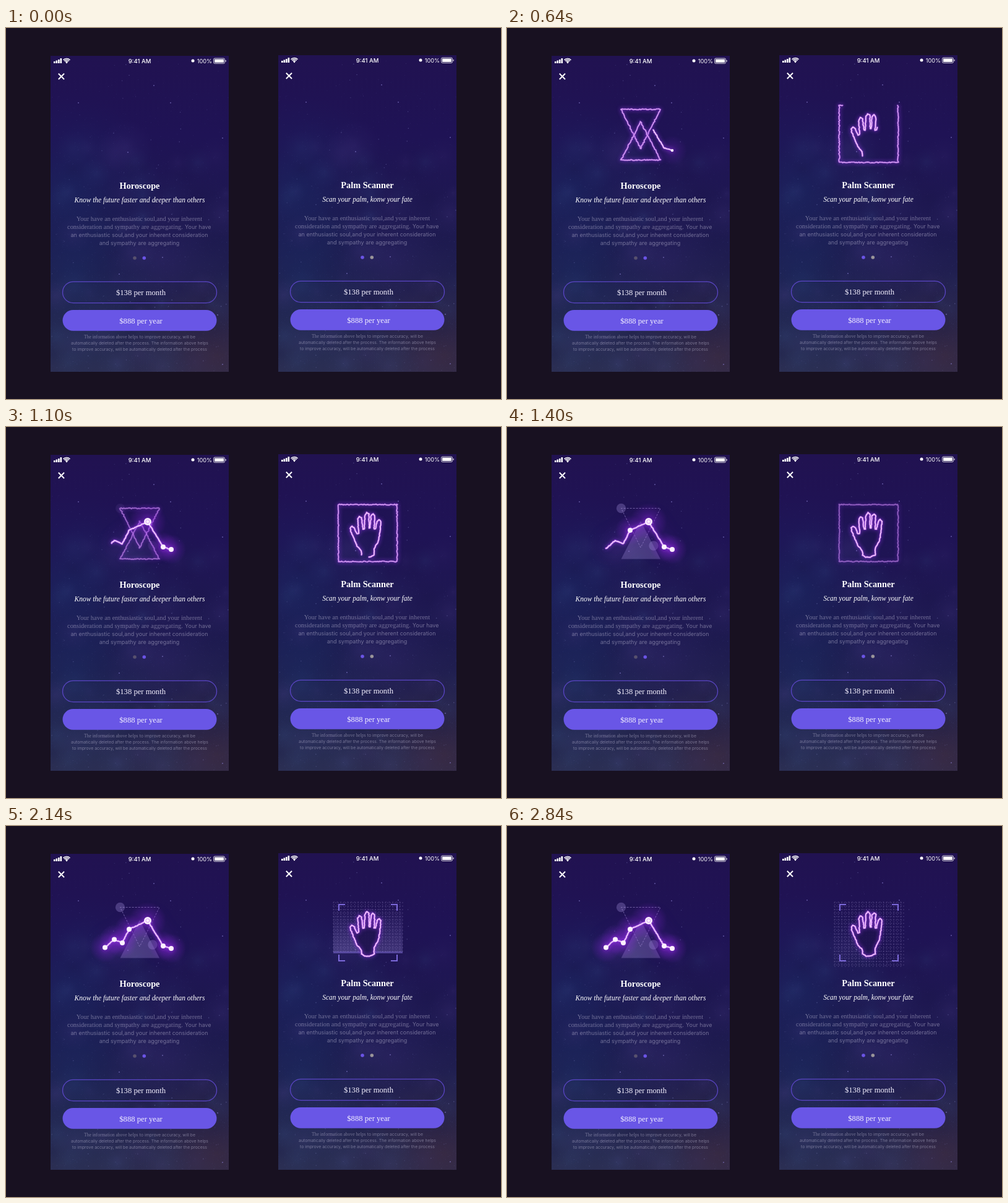
Animation of 800 by 600 pixels, one loop 2.88 s. Source, as an HTML page with a canvas:

```html
<!DOCTYPE html>
<html lang="en">
<head>
<meta charset="utf-8">
<title>Horoscope and Palm Scanner</title>
<style>
html, body { margin: 0; width: 100%; height: 100%; overflow: hidden; background: #181121; }
canvas { display: block; }
</style>
</head>
<body>
<canvas id="stage" width="800" height="600"></canvas>
<script>
const LOOP = 2880, TAU = Math.PI * 2;
const SERIF = '"Liberation Serif", serif', SANS = 'Inter, sans-serif';
const stage = document.getElementById('stage').getContext('2d');
const backdrop = document.createElement('canvas');
backdrop.width = 800;
backdrop.height = 600;

const clamp = v => Math.max(0, Math.min(1, v));
const ramp = (t, a, b) => clamp((t - a) / (b - a));
const easeOut = (u, k) => 1 - (1 - u) ** k;
const easeSine = u => (1 - Math.cos(Math.PI * u)) / 2;

function random(seed) {
  return () => (seed = (seed * 16807) % 2147483647) / 2147483647;
}

function disc(c, x, y, r, fill) {
  c.fillStyle = fill;
  c.beginPath();
  c.arc(x, y, r, 0, TAU);
  c.fill();
}

function glow(c, x, y, r, rgb, alpha) {
  const g = c.createRadialGradient(x, y, 0, x, y, r);
  g.addColorStop(0, `rgba(${rgb},${alpha})`);
  g.addColorStop(0.45, `rgba(${rgb},${alpha * 0.4})`);
  g.addColorStop(1, `rgba(${rgb},0)`);
  c.fillStyle = g;
  c.fillRect(x - r, y - r, r * 2, r * 2);
}

function polyline(c, pts, closed) {
  c.beginPath();
  pts.forEach(([x, y]) => c.lineTo(x, y));
  if (closed) c.closePath();
}

// Static screens, drawn once; coordinates are those of the left phone.

function text(c, str, x, y, font, fill, align = 'center') {
  c.font = font;
  c.fillStyle = fill;
  c.textAlign = align;
  c.fillText(str, x, y);
}

function sky(c, height) {
  c.save();
  c.beginPath();
  c.rect(72, 45, 288, height);
  c.clip();
  const g = c.createLinearGradient(0, 45, 0, 556);
  g.addColorStop(0, '#211251');
  g.addColorStop(0.25, '#1f1355');
  g.addColorStop(0.6, '#1e1b50');
  g.addColorStop(0.85, '#24244d');
  g.addColorStop(1, '#2c2b4e');
  c.fillStyle = g;
  c.fillRect(72, 45, 288, 512);
  glow(c, 105, 260, 150, '22,52,108', 0.35);
  glow(c, 110, 400, 150, '22,50,108', 0.35);
  glow(c, 255, 375, 100, '58,44,122', 0.25);
  glow(c, 110, 530, 140, '38,58,100', 0.35);
  glow(c, 340, 530, 130, '68,42,58', 0.5);

  const rnd = random(4127);
  // Mottled clouds drifting down the left side and across the middle.
  for (let i = 0; i < 90; i++) {
    const x = 72 + rnd() * 288, y = 190 + rnd() * 360;
    const tone = ['60,90,150', '20,16,60', '90,70,150'][i % 3];
    glow(c, x, y, 12 + rnd() * 34, tone, 0.05 + rnd() * 0.1);
  }
  for (let i = 0; i < 2600; i++) {
    c.fillStyle = `rgba(140,150,215,${rnd() * 0.12})`;
    c.fillRect(72 + rnd() * 288, 45 + 511 * Math.sqrt(rnd()), 1, 1);
  }
  for (let i = 0; i < 130; i++)
    disc(c, 72 + rnd() * 288, 45 + rnd() * 511, 0.3 + rnd() * 0.6, `rgba(155,160,225,${0.1 + rnd() * 0.3})`);
  [[239, 93], [266, 121], [117, 121], [350, 178], [197, 201], [253, 371], [183, 398], [342, 464], [350, 544]]
    .forEach(([x, y]) => disc(c, x, y, 1.1, 'rgba(150,140,225,.5)'));
  c.restore();
}

function statusBar(c) {
  c.fillStyle = '#fff';
  [3, 4.5, 6, 8].forEach((h, i) => c.fillRect(77 + i * 3.5, 57 - h, 2.6, h));
  c.strokeStyle = '#fff';
  c.lineWidth = 1.5;
  [2.9, 5.3, 7.6].forEach(r => {
    c.beginPath();
    c.arc(98, 57, r, -Math.PI * 0.76, -Math.PI * 0.24);
    c.stroke();
  });
  disc(c, 98, 56, 1.2, '#fff');
  text(c, '9:41 AM', 216, 56.5, `500 9.5px ${SANS}`, '#fff');
  disc(c, 302, 53, 2.5, '#fff');
  text(c, '100%', 333, 56.5, `400 9.2px ${SANS}`, '#fff', 'right');
  c.lineWidth = 0.8;
  c.beginPath();
  c.roundRect(335.5, 49, 18, 8.5, 2);
  c.stroke();
  c.fillRect(337, 50.5, 15, 5.5);
  c.fillRect(354.6, 52, 1, 2.6);

  c.lineWidth = 2;
  c.beginPath();
  c.moveTo(84.8, 73.8); c.lineTo(94, 83);
  c.moveTo(94, 73.8); c.lineTo(84.8, 83);
  c.stroke();
}

function phone(c, dx, dy, height, title, tagline, dots) {
  c.save();
  c.translate(dx, dy);
  sky(c, height);
  statusBar(c);
  text(c, title, 216, 260, `bold 14.3px ${SERIF}`, '#fff');
  text(c, tagline, 216, 281.5, `italic 11.45px ${SERIF}`, '#fff');

  const body = 'rgba(205,200,225,.48)';
  const bodySerif = `10.45px ${SERIF}`, bodySans = `9px ${SANS}`;
  text(c, 'Your have an enthusiastic soul,and your inherent', 215.5, 312, bodySerif, body);
  text(c, 'consideration and sympathy are aggregating.', 99, 325, bodySerif, body, 'left');
  text(c, 'Your have', 331.5, 325, bodySans, body, 'right');
  text(c, 'an enthusiastic soul,and your inherent consideration', 215.5, 338, bodySans, body);
  text(c, 'and sympathy are aggregating', 215.5, 350.5, bodySans, body);

  dots.forEach((fill, i) => disc(c, 208 + i * 15.3, 372, 2.8, fill));

  c.strokeStyle = '#5a45c4';
  c.lineWidth = 1.3;
  c.beginPath();
  c.roundRect(91.5, 410.4, 249, 34.2, 17.1);
  c.stroke();
  c.fillStyle = '#6956e6';
  c.beginPath();
  c.roundRect(91.5, 456, 249, 33.8, 16.9);
  c.fill();
  text(c, '$138 per month', 218, 432, `12.65px ${SERIF}`, '#f4f1ff');
  text(c, '$888 per year', 218, 477.5, `12.65px ${SERIF}`, '#f4f1ff');

  const noteSans = `6.85px ${SANS}`;
  text(c, 'The information above helps', 126, 501.5, `7.6px ${SERIF}`, body, 'left');
  text(c, 'to improve accuracy, will be', 306, 501.5, noteSans, body, 'right');
  text(c, 'automatically deleted after the process. The information above helps', 216, 511.5, noteSans, body);
  text(c, 'to improve accuracy, will be automatically deleted after the process', 216, 521.5, noteSans, body);
  c.restore();
}

function drawBackdrop() {
  const c = backdrop.getContext('2d');
  c.fillStyle = '#181121';
  c.fillRect(0, 0, 800, 600);
  phone(c, 0, 0, 511, 'Horoscope', 'Know the future faster and deeper than others', ['#58516e', '#6b54e6']);
  phone(c, 368, -1, 512, 'Palm Scanner', 'Scan your palm, konw your fate', ['#6b54e6', '#9a9599']);
}

// Electric strokes: even samples along a path, shaken a little on every tick.

function sample(pts) {
  const out = [];
  for (let i = 1; i < pts.length; i++) {
    const [ax, ay] = pts[i - 1], [bx, by] = pts[i];
    const n = Math.max(1, Math.round(Math.hypot(bx - ax, by - ay) / 2));
    for (let j = 0; j < n; j++) out.push([ax + (bx - ax) * j / n, ay + (by - ay) * j / n]);
  }
  out.push(pts[pts.length - 1]);
  return out;
}

const topTriangle = [[216, 195], [184.5, 131.5], [248, 131.5], [216, 195]];
const lowTriangle = [[216, 152], [248, 213.5], [184.5, 213.5], [216, 152]];
const stars = [[267, 198], [254, 194], [229, 153], [199, 167], [188, 189], [175, 183.5], [160, 196.5]];
const starTimes = [600, 720, 950, 1250, 1420, 1500, 1720];
const frame = [[632, 125.5], [632, 217.5], [537, 217.5], [537, 125.5], [632, 125.5]];
const hand = [
  [575, 207], [574, 200], [567, 192], [562, 180], [557, 168], [556.5, 163], [559, 160.5], [563, 163], [567, 173],
  [570, 172], [568.5, 149], [571, 145], [574.5, 147], [577, 165], [579, 165],
  [580, 143], [583, 138.5], [586.5, 141], [587, 163], [588.5, 163],
  [590, 144], [593, 140.5], [596, 143.5], [595, 165], [597, 165],
  [600, 153], [603, 149.5], [606, 153], [604, 172], [602, 184], [595, 197], [595, 207],
  [587, 210.5], [580, 210.5], [575, 207]
];
const [topPath, lowPath, starPath, framePath, handPath] =
  [topTriangle, lowTriangle, stars, frame, hand].map(sample);

function electric(path, part, tick, { shake = 1.5, core = '#d6a2f2', width = 1.4, alpha = 1, halo = 0 } = {}) {
  if (part <= 0 || alpha <= 0) return;
  const c = stage, rnd = random(911 + tick * 53 + path.length);
  const pts = path.slice(0, Math.ceil(path.length * part))
    .map(([x, y]) => [x + (rnd() - 0.5) * shake, y + (rnd() - 0.5) * shake]);
  c.save();
  c.globalAlpha = alpha;
  c.lineJoin = c.lineCap = 'round';
  polyline(c, pts);
  c.strokeStyle = 'rgba(158,80,220,.7)';
  c.lineWidth = width * 2;
  if (halo) {
    c.shadowColor = `rgba(150,45,235,${halo})`;
    c.shadowBlur = 30;
    c.stroke();
  }
  c.shadowColor = '#9a3cf0';
  c.shadowBlur = 6;
  c.stroke();
  c.shadowBlur = 0;
  c.strokeStyle = core;
  c.lineWidth = width;
  c.stroke();
  c.restore();
}

function horoscope(t, tick) {
  const c = stage;
  const solid = ramp(t, 1000, 1400);
  if (solid) {
    c.save();
    c.globalAlpha = solid;
    c.fillStyle = 'rgba(165,145,220,.3)';
    polyline(c, lowTriangle, true);
    c.fill();
    disc(c, 184.5, 131.5, 7.7, 'rgba(165,145,220,.32)');
    disc(c, 237, 192, 7.7, 'rgba(165,145,220,.32)');
    c.setLineDash([3, 2]);
    c.lineWidth = 1;
    c.strokeStyle = 'rgba(165,145,215,.6)';
    polyline(c, topTriangle, true);
    c.stroke();
    c.restore();
  }
  const drawn = ramp(t, 0, 490), alpha = 1 - ramp(t, 900, 1350);
  electric(topPath, drawn, tick, { alpha });
  electric(lowPath, drawn, tick, { alpha });

  const pops = starTimes.map(s => easeOut(ramp(t, s, s + 150), 2));
  stars.forEach(([x, y], i) => {
    if (pops[i]) glow(c, x, y, i === 2 ? 30 : 24, '150,40,235', 0.55 * pops[i]);
  });
  electric(starPath, easeOut(ramp(t, 520, 1470), 2.5), tick,
    { shake: 0.9, core: '#f5d2ff', width: 1.7, halo: ramp(t, 850, 1400) });
  stars.forEach(([x, y], i) => {
    if (!pops[i]) return;
    const r = (i === 2 ? 6 : 4) * pops[i];
    disc(c, x, y, r, '#fdf0ff');
    if (i === 2) {
      c.strokeStyle = '#dba6f8';
      c.lineWidth = 1;
      c.beginPath();
      c.arc(x, y, r * 0.5, 0, TAU);
      c.stroke();
    }
  });
}

function grid(bottom) {
  const c = stage;
  c.save();
  c.beginPath();
  c.rect(528, 122, 114, bottom - 122);
  c.clip();
  c.setLineDash([2, 2]);
  c.lineWidth = 0.7;
  c.strokeStyle = 'rgba(190,175,235,.36)';
  c.beginPath();
  for (let x = 530; x <= 641; x += 5.6) { c.moveTo(x, 122); c.lineTo(x, 230); }
  for (let y = 124; y <= 230; y += 5.6) { c.moveTo(528, y); c.lineTo(642, y); }
  c.stroke();
  c.restore();
}

function scanBar(bottom, alpha) {
  const c = stage, top = Math.max(122, bottom - 75);
  const g = c.createLinearGradient(0, bottom - 75, 0, bottom);
  g.addColorStop(0, 'rgba(130,115,190,0)');
  g.addColorStop(1, 'rgba(130,115,190,.34)');
  c.save();
  c.globalAlpha = alpha;
  c.fillStyle = g;
  c.fillRect(529, top, 112, bottom - top);
  c.fillStyle = 'rgba(120,100,215,.4)';
  c.fillRect(529, bottom - 3, 112, 3);
  c.restore();
}

function corners(alpha) {
  const c = stage;
  c.save();
  c.globalAlpha = alpha;
  c.strokeStyle = '#7c69da';
  c.lineWidth = 2;
  for (const [x, sx] of [[538, 1], [632, -1]])
    for (const [y, sy] of [[127, 1], [218, -1]]) {
      polyline(c, [[x, y + 10 * sy], [x, y], [x + 10 * sx, y]]);
      c.stroke();
    }
  c.restore();
}

function palm(t, tick) {
  const c = stage;
  const alpha = 1 - 0.5 * ramp(t, 1100, 1400) - 0.4 * ramp(t, 1400, 1650) - 0.1 * ramp(t, 1650, 1900);
  electric(framePath, easeOut(ramp(t, 0, 1100), 1.59), tick, { alpha });

  const scan = easeSine(ramp(t, 1473, 2460));
  if (scan) {
    const bottom = 122 + 108 * scan;
    grid(bottom);
    scanBar(bottom, 1 - ramp(t, 2400, 2600));
  }
  corners(ramp(t, 1420, 1620));

  const inside = ramp(t, 1300, 1500);
  if (inside) {
    c.fillStyle = `rgba(30,18,78,${0.9 * inside})`;
    polyline(c, hand, true);
    c.fill();
  }
  electric(handPath, easeOut(ramp(t, 0, 1400), 2), tick, { shake: 1, core: '#f6c6ff', width: 1.7 });
}

function draw(now) {
  // Twenty pictures a second, alternately held for 40 and 60 ms.
  const ms = now % LOOP;
  const t = Math.floor(ms / 100) * 100 + (ms % 100 >= 40 ? 50 : 0);
  const tick = t / 50;
  stage.drawImage(backdrop, 0, 0);
  if (t > 0) {
    horoscope(t, tick);
    palm(t, tick);
  }
}

drawBackdrop();
const start = performance.now();
function loop() {
  draw(performance.now() - start);
  requestAnimationFrame(loop);
}
loop();
</script>
</body>
</html>
```
